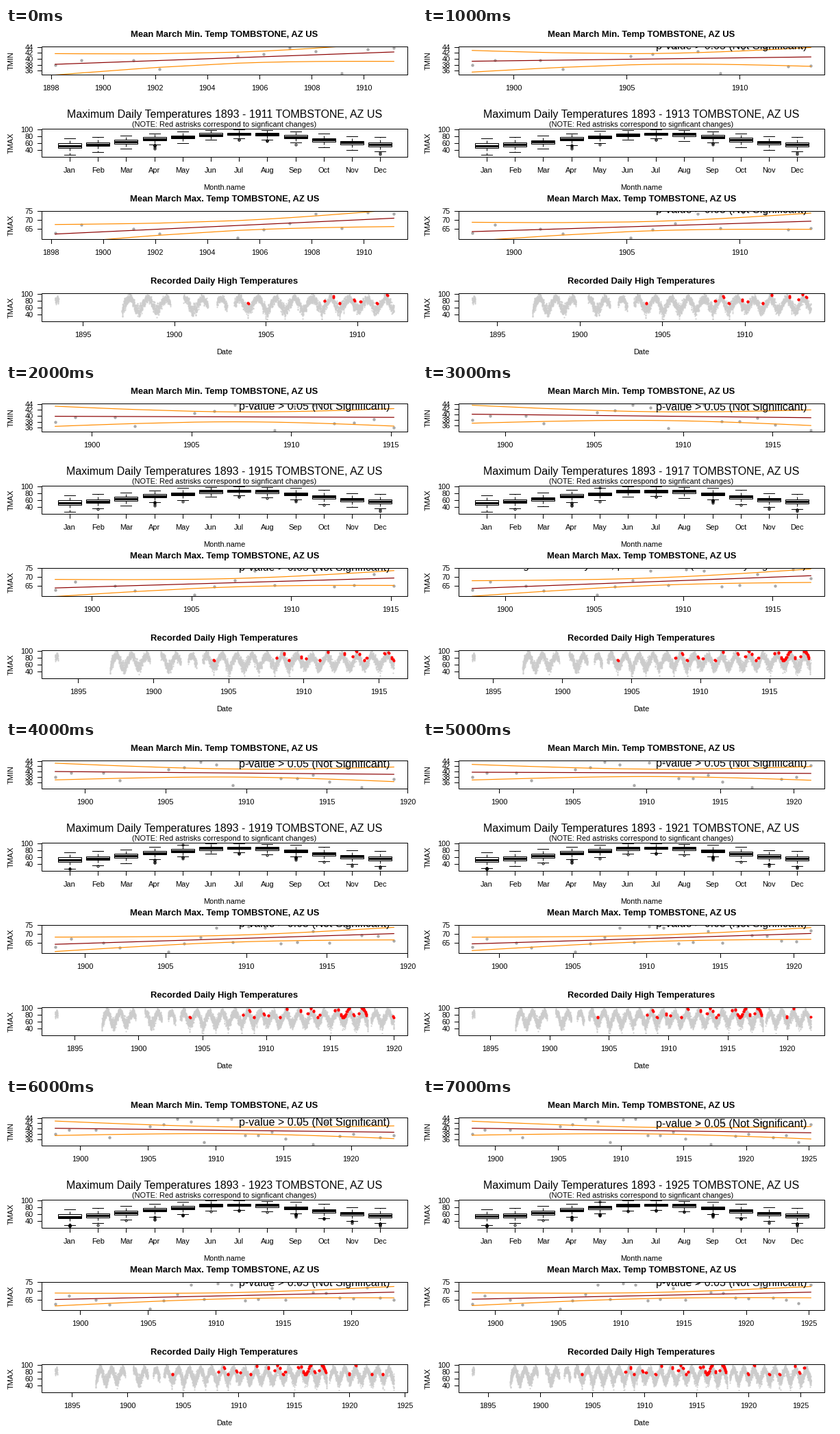
Write a matplotlib script that moves like this. It is 600 px wide and 480 px high and loops after 8000 ms.

```python
import matplotlib.pyplot as plt
import numpy as np
from matplotlib.animation import FuncAnimation
from matplotlib.patches import Rectangle

W, H, DPI = 600, 480, 100
PT = 72 / DPI                      # points per pixel
LEFT, RIGHT, HEIGHT = 52, 586, 41
MID = (LEFT + RIGHT) / 2
MARGIN = 0.04 / 1.08               # share of a panel kept free at each end
PLACE = "TOMBSTONE, AZ US"
MONTHS = "Jan Feb Mar Apr May Jun Jul Aug Sep Oct Nov Dec".split()
START = 1893.48                    # first day on record

plt.rcParams["font.family"] = "Liberation Sans"

# March means, one per year; every curve in the trend panels follows from them
YEARS = np.array([1898, 1899, 1901, 1902, *range(1905, 1926)])
TMIN = np.array([38, 39.5, 39.6, 36.6, 40.8, 41.6, 43.7, 42.6, 35, 43.3, 43.8,
                 37.5, 37.6, 38.8, 36.1, 42, 34, 42.3, 37.1, 38, 42.5, 36.7,
                 37.4, 34.8, 41.5])
TMAX = np.array([62.4, 67.3, 64.8, 62.1, 59.5, 64.4, 67.9, 73.4, 65.2, 74.5,
                 73.4, 64.4, 65.4, 71.7, 64.8, 74.2, 69.3, 68.9, 66, 65.8,
                 71.9, 66.2, 64.8, 62.8, 73.4])

# Dates of record highs: single spells and two long runs
SPELLS = np.sort(np.r_[
    1904.03, 1908.2, 1908.7, 1909.03, 1909.83, 1910.17, 1911.08, 1911.63,
    1912.7, 1913.25, 1913.5, 1913.72, 1914.02, 1914.2, 1915.37, 1915.65,
    1915.85, np.linspace(1915.97, 1916.5, 7), 1916.85, 1917.25,
    np.linspace(1917.5, 1917.85, 6), 1919.97, 1920.56, 1922, 1923,
    1924.45, 1924.9, 1925.36])


def season(t):
    """Typical high and its spread at a date."""
    wave = np.cos(2 * np.pi * (t - 0.03))
    return 71 - 16.5 * wave, 7 + 1.7 * wave


def daily_highs():
    """Simulated daily highs, without the gaps in the record."""
    rng = np.random.default_rng(7)
    t = np.arange(START, 1926, 1 / 365.25)
    noise = np.convolve(rng.normal(size=t.size), 0.6 ** np.arange(20), "same")
    noise = np.clip(noise / noise.std(), -3, 2.3)
    noise[noise < 0] *= 1.1
    base, spread = season(t)
    keep = np.ones(t.size, bool)
    for a, b in [(1893.66, 1897.13), (1899.77, 1900.5), (1901.83, 1902.32),
                 (1902.88, 1903.27), (1917.97, 1918.2)]:
        keep &= (t < a) | (t > b)
    return t[keep], (base + spread * noise)[keep]


def record_highs():
    """A warmer and a milder day for each spell."""
    t = np.r_[SPELLS - 0.01, SPELLS + 0.01]
    base, spread = season(t)
    return t, base + spread * np.repeat([2.3, 2.0], len(SPELLS))


DAYS, HIGHS = daily_highs()
HOT_DAYS, HOT = record_highs()

fig = plt.figure(figsize=(W / DPI, H / DPI), dpi=DPI, facecolor="white")
ax = fig.add_axes([0, 0, 1, 1])


def label(x, y, s, size=11, **kw):
    return ax.text(x, y, s, fontsize=size * PT, **{"ha": "center", **kw})


def line(x, y, color="black", width=1, **kw):
    return ax.plot(x, y, color=color, lw=width * PT, **kw)[0]


def dots(x, y, color, size, marker="o"):
    return ax.plot(x, y, marker, color=color, ms=size * PT, mew=0)[0]


def x_ticks(top, ticks):
    for x, s in ticks:
        line([x, x], [top + HEIGHT, top + HEIGHT + 6])
        label(x, top + 64, s)


def y_ticks(row, values):
    for v in values:
        line([LEFT - 6, LEFT], [row(v), row(v)])
        label(39.5, row(v) + 4, str(v), ha="right")


def panel(top, name):
    frame = Rectangle((LEFT, top), RIGHT - LEFT, HEIGHT, fill=False,
                      lw=PT, ec="black", zorder=3)
    ax.add_patch(frame)
    label(7.5, top + HEIGHT / 2, name, rotation=90, va="center")
    return frame


def time_scale(t0, t1):
    pad = (RIGHT - LEFT) * MARGIN
    return lambda t: LEFT + pad + ((RIGHT - LEFT - 2 * pad)
                                   * (t - t0) / (t1 - t0))


def degree_scale(top):
    return lambda v: top + 1 + (100 - v) / 2


def year_ticks(scale, step):
    years = np.arange(1890, 1930, step)
    return [(scale(y), str(y)) for y in years if LEFT < scale(y) < RIGHT]


def fit(x, y):
    """Regression line, half width of its 95 % band, slope, significance."""
    n, dx = len(x), x - x.mean()
    sxx = (dx ** 2).sum()
    slope = (dx * y).sum() / sxx
    mean = y.mean() + slope * dx
    s = np.sqrt(((y - mean) ** 2).sum() / (n - 2))
    t = 1.96 + 2.37 / (n - 2) + 2.82 / (n - 2) ** 2
    half = t * s * np.sqrt(1 / n + dx ** 2 / sxx)
    return mean, half, slope, abs(slope) > t * s / np.sqrt(sxx)


def trend(top, name, kind, data, ticks, i, end):
    frame = panel(top, name)
    n = int((YEARS <= end).sum())
    years, vals = YEARS[:n], data[:n]
    scale = time_scale(1898, end)
    lo, hi = vals.min(), vals.max()
    pad = HEIGHT * MARGIN

    def row(v):
        return top + pad + (hi - v) / (hi - lo) * (HEIGHT - 2 * pad)

    mean, half, slope, strong = fit(years, vals)
    if strong:
        note = (f"Change = {100 * slope:.0f}/100 years, p-value < 0.05 "
                "(Statistically Significant)")
    else:
        note = "p-value > 0.05 (Not Significant)"
    x = scale(years)
    base = row(mean[-1]) - 12 + i / 2
    parts = [dots(x, row(vals), "darkgray", 4.4),
             line(x, row(mean), "darkred", 1.2),
             line(x, row(mean + half), "darkorange", 1.2),
             line(x, row(mean - half), "darkorange", 1.2),
             label(560, base, note, 16, ha="right", clip_on=True)]
    for p in parts:
        p.set_clip_path(frame)

    label(MID, top - 14, f"Mean March {kind}. Temp {PLACE}", 13, weight="bold")
    y_ticks(row, ticks)
    x_ticks(top, year_ticks(time_scale(1898.16, end + 0.16),
                            2 if end < 1912 else 5))


def box(x, vals, row, frame):
    """Box plot with whiskers up to 1.5 box heights and rings beyond."""
    q1, med, q3 = np.percentile(vals, [25, 50, 75])
    reach = 1.5 * (q3 - q1)
    inside = (vals >= q1 - reach) & (vals <= q3 + reach)
    for edge, tip in ((q1, vals[inside].min()), (q3, vals[inside].max())):
        line([x, x], [row(edge), row(tip)], ls=(0, (4, 3)))
        line([x - 8, x + 8], [row(tip), row(tip)])
    ax.add_patch(Rectangle((x - 17, row(q3)), 34, row(q1) - row(q3),
                           fc="white", ec="black", lw=PT, zorder=2))
    line([x - 17, x + 17], [row(med), row(med)], width=3.2, zorder=2.5,
         solid_capstyle="butt")
    out = vals[~inside]
    rings = ax.plot(np.full(out.size, x), row(out), "o", ms=3 * PT,
                    mfc="none", mec="black", mew=PT)[0]
    rings.set_clip_path(frame)


def monthly(top, end):
    frame, row = panel(top, "TMAX"), degree_scale(top)
    label(MID, 131, f"Maximum Daily Temperatures 1893 - {end} {PLACE}", 16)
    label(MID, 144, "(NOTE: Red astrisks correspond to signficant changes)")
    label(MID, 236, "Month.name")
    y_ticks(row, (100, 80, 60, 40))
    xs = 93 + 41.2 * np.arange(12)
    x_ticks(top, zip(xs, MONTHS))
    month = (DAYS % 1 * 12).astype(int)
    for m, x in enumerate(xs):
        box(x, HIGHS[(month == m) & (DAYS < end + 1)], row, frame)


def daily(top, end):
    frame, row = panel(top, "TMAX"), degree_scale(top)
    scale = time_scale(START, end + 1)
    seen, hot = DAYS < end + 1, HOT_DAYS < end + 1
    for p in (dots(scale(DAYS[seen]), row(HIGHS[seen]), "#cccccc", 1.8, "s"),
              dots(scale(HOT_DAYS[hot]), row(HOT[hot]), "red", 4)):
        p.set_clip_path(frame)
    label(MID, top - 14, "Recorded Daily High Temperatures", 13, weight="bold")
    label(MID, 476, "Date")
    y_ticks(row, (100, 80, 60, 40))
    x_ticks(top, year_ticks(scale, 5))


def draw(i):
    end = 1911 + 2 * i
    ax.cla()
    ax.set_xlim(0, W)
    ax.set_ylim(H, 0)
    ax.axis("off")
    trend(27, "TMIN", "Min", TMIN, (44, 42, 40, 38, 36), i, end)
    monthly(147, end)
    trend(267, "TMAX", "Max", TMAX, (75, 70, 65), i, end)
    daily(387, end)
    return []


anim = FuncAnimation(fig, draw, frames=8, interval=1000, repeat=True,
                     init_func=lambda: [])
plt.show()
```
